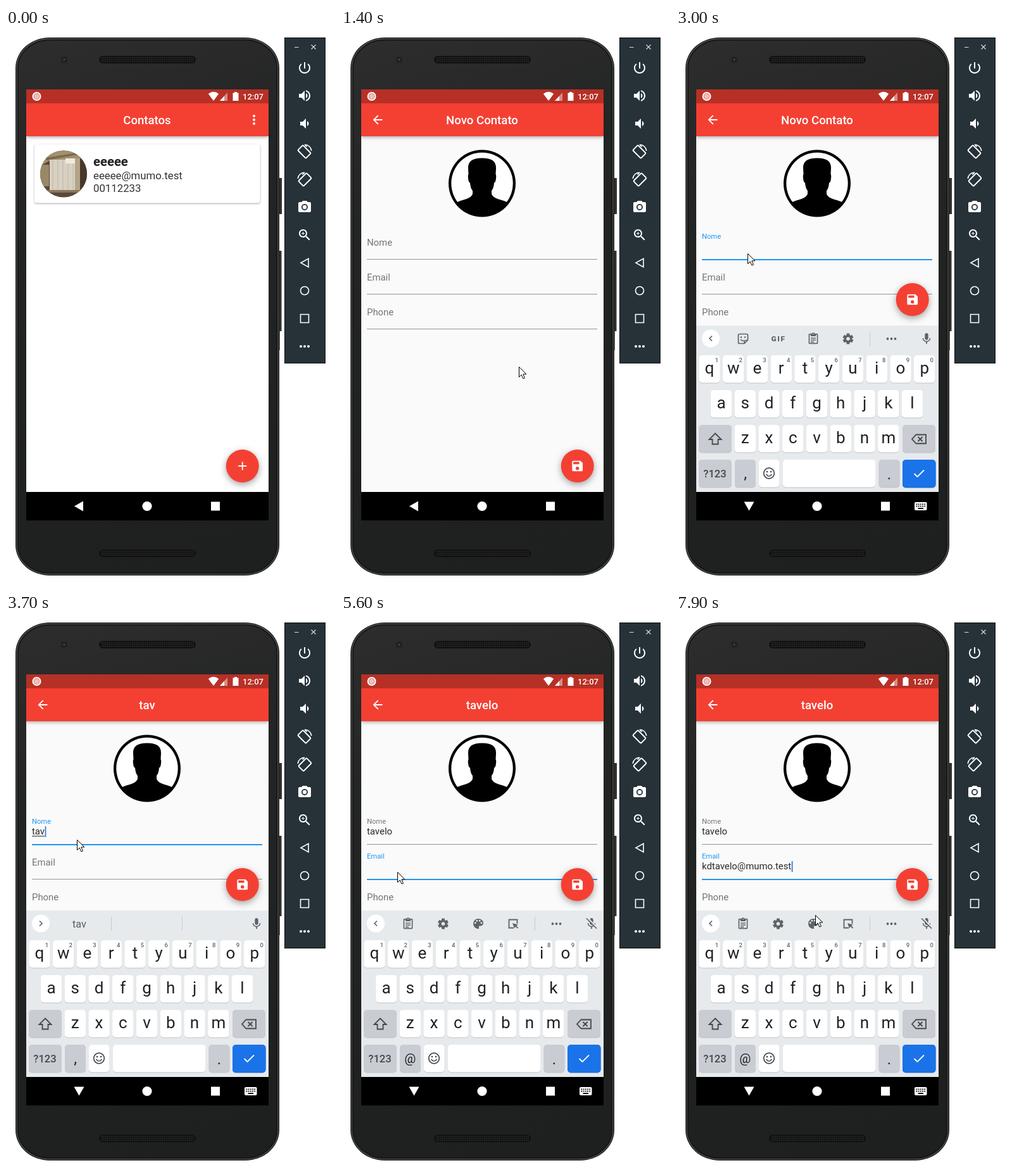
Recreate the animation shown at these times as an HTML page with a canvas. Size 520 by 880 pixels, loop 8 s.

```html
<!DOCTYPE html>
<html lang="pt">
<head>
<meta charset="utf-8">
<title>Contatos</title>
<style>
html, body { margin: 0; width: 100%; height: 100%; overflow: hidden; background: #fff; }
canvas { display: block; }
</style>
</head>
<body>
<canvas id="stage" width="520" height="880"></canvas>
<script>
const ctx = document.getElementById('stage').getContext('2d');
const LOOP = 8000, STEP = 100;
const RED = '#f44033', BLUE = '#2196f3', GREY = '#5f6368', INK = '#202124', TRAY = '#e6eaed';
const NAME = 'tavelo', USER = 'kdtavelo', HOST = '@mumo.test';
const NAME_KEYS = [3400, 3530, 3660, 3790, 3920, 4050];
const MAIL_KEYS = [5900, 6100, 6400, 6600];
const T = { press: 900, page: 1050, name: 2400, board: 2600, mail: 4800, pick: 7700, tools: 7800 };

const ICON = {
  back: 'M20 11H7.83l5.59-5.59L12 4l-8 8 8 8 1.41-1.41L7.83 13H20v-2z',
  add: 'M19 13h-6v6h-2v-6H5v-2h6V5h2v6h6v2z',
  save: 'M17 3H5c-1.11 0-2 .9-2 2v14c0 1.1.89 2 2 2h14c1.1 0 2-.9 2-2V7l-4-4zm-5 16c-1.66 0-3-1.34-3-3s1.34-3 3-3 3 1.34 3 3-1.34 3-3 3zm3-10H5V5h10v4z',
  power: 'M13 3h-2v10h2V3zm4.83 2.17l-1.42 1.42C17.99 7.86 19 9.81 19 12c0 3.87-3.13 7-7 7s-7-3.13-7-7c0-2.19 1.01-4.14 2.58-5.42L6.17 5.17C4.23 6.82 3 9.26 3 12c0 4.97 4.03 9 9 9s9-4.03 9-9c0-2.74-1.23-5.18-3.17-6.83z',
  louder: 'M3 9v6h4l5 5V4L7 9H3zm13.5 3c0-1.77-1.02-3.29-2.5-4.03v8.05c1.48-.73 2.5-2.25 2.5-4.02zM14 3.23v2.06c2.89.86 5 3.54 5 6.71s-2.11 5.85-5 6.71v2.06c4.01-.91 7-4.49 7-8.77s-2.99-7.86-7-8.77z',
  softer: 'M18.5 12c0-1.77-1.02-3.29-2.5-4.03v8.05c1.48-.73 2.5-2.25 2.5-4.02zM5 9v6h4l5 5V4L9 9H5z',
  camera: 'M9 2L7.17 4H4c-1.1 0-2 .9-2 2v12c0 1.1.9 2 2 2h16c1.1 0 2-.9 2-2V6c0-1.1-.9-2-2-2h-3.17L15 2H9zm3 15c-2.76 0-5-2.24-5-5s2.24-5 5-5 5 2.24 5 5-2.24 5-5 5z',
  zoom: 'M15.5 14h-.79l-.28-.27C15.41 12.59 16 11.11 16 9.5 16 5.91 13.09 3 9.5 3S3 5.91 3 9.5 5.91 16 9.5 16c1.61 0 3.09-.59 4.23-1.57l.27.28v.79l5 4.99L20.49 19l-4.99-5zm-6 0C7.01 14 5 11.99 5 9.5S7.01 5 9.5 5 14 7.01 14 9.5 11.99 14 9.5 14zm2.5-4h-2v2H9v-2H7V9h2V7h1v2h2v1z',
  paste: 'M19 2h-4.18C14.4.84 13.3 0 12 0c-1.3 0-2.4.84-2.82 2H5c-1.1 0-2 .9-2 2v16c0 1.1.9 2 2 2h14c1.1 0 2-.9 2-2V4c0-1.1-.9-2-2-2zm-7 0c.55 0 1 .45 1 1s-.45 1-1 1-1-.45-1-1 .45-1 1-1zm7 18H5V4h2v3h10V4h2v16z',
  palette: 'M12 3c-4.97 0-9 4.03-9 9s4.03 9 9 9c.83 0 1.5-.67 1.5-1.5 0-.39-.15-.74-.39-1.01-.23-.26-.38-.61-.38-.99 0-.83.67-1.5 1.5-1.5H16c2.76 0 5-2.24 5-5 0-4.42-4.03-8-9-8z',
  mic: 'M12 14c1.66 0 2.99-1.34 2.99-3L15 5c0-1.66-1.34-3-3-3S9 3.34 9 5v6c0 1.66 1.34 3 3 3zm5.3-3c0 3-2.54 5.1-5.3 5.1S6.7 14 6.7 11H5c0 3.41 2.72 6.23 6 6.72V21h2v-3.28c3.28-.48 6-3.3 6-6.72h-1.7z'
};
for (const k in ICON) ICON[k] = new Path2D(ICON[k]);

// Pointer path: time, x, y
const PATH = [
  [300, 512, 640], [700, 378, 692], [1000, 372, 690], [1200, 340, 630], [1400, 281, 535],
  [1600, 240, 470], [2000, 140, 352], [2100, 114, 343], [2200, 113, 356], [3000, 113, 356],
  [3200, 112, 358], [4500, 112, 358], [4800, 89, 409], [5600, 89, 409], [6200, 87, 428],
  [7100, 87, 428], [7500, 214, 490], [7700, 220, 477]
];

const clamp = v => Math.max(0, Math.min(1, v));
const lerp = (a, b, p) => a + (b - a) * p;
const easeOut = p => 1 - (1 - p) ** 3;

function rect(x, y, w, h, color) { ctx.fillStyle = color; ctx.fillRect(x, y, w, h); }
function round(x, y, w, h, r, color) {
  ctx.fillStyle = color;
  ctx.beginPath(); ctx.roundRect(x, y, w, h, r); ctx.fill();
}
function disc(x, y, r, color) {
  ctx.fillStyle = color;
  ctx.beginPath(); ctx.arc(x, y, r, 0, 7); ctx.fill();
}
function ring(x, y, r, color, w) {
  ctx.strokeStyle = color; ctx.lineWidth = w;
  ctx.beginPath(); ctx.arc(x, y, r, 0, 7); ctx.stroke();
}
function fill(d, color) { ctx.fillStyle = color; ctx.fill(new Path2D(d)); }
function line(d, color, w) { ctx.strokeStyle = color; ctx.lineWidth = w; ctx.stroke(new Path2D(d)); }
function text(s, x, y, size, color, weight = 400, align = 'left') {
  ctx.font = `${weight} ${size}px Roboto, sans-serif`;
  ctx.fillStyle = color; ctx.textAlign = align;
  ctx.fillText(s, x, y);
}
function icon(name, x, y, s, color) {
  ctx.save();
  ctx.translate(x, y); ctx.scale(s, s); ctx.translate(-12, -12);
  ctx.fillStyle = color; ctx.fill(ICON[name]);
  ctx.restore();
}
function dots(x, y, dx, dy, r, color) {
  for (let i = -1; i < 2; i++) disc(x + i * dx, y + i * dy, r, color);
}
function shadowed(blur, dy, alpha, draw) {
  ctx.save();
  ctx.shadowColor = `rgba(0,0,0,${alpha})`; ctx.shadowBlur = blur; ctx.shadowOffsetY = dy;
  draw();
  ctx.restore();
}

function shell(inset) {
  ctx.beginPath();
  ctx.roundRect(15 + inset, 15 + inset, 417 - 2 * inset, 850 - 2 * inset, { x: 54 - inset, y: 48 - inset });
}
function drawPhone() {
  rect(432, 237, 4, 57, '#303030');
  rect(432, 352, 3.5, 127, '#303030');
  rect(432, 479, 1, 30, '#666');
  ctx.fillStyle = '#191a1a'; shell(0); ctx.fill();
  const g = ctx.createLinearGradient(60, 15, 330, 865);
  g.addColorStop(0, '#2d2d2d'); g.addColorStop(.3, '#232424'); g.addColorStop(1, '#1e1f1f');
  ctx.fillStyle = g; shell(2); ctx.fill();
  ctx.lineWidth = 1.4;
  ctx.strokeStyle = '#4d4e4e'; shell(2); ctx.stroke();
  ctx.strokeStyle = '#141515'; shell(4); ctx.stroke();
  disc(92, 50, 6, '#1b1c1c'); ring(92, 50, 5, '#343636', 1); disc(92, 50, 2, '#3c4043');
  for (const y of [44, 824]) {
    round(147, y, 153, 12, 6, '#111');
    for (let i = 0; i < 49; i++)
      for (let j = 0; j < 3; j++) rect(151 + i * 3, y + 2 + j * 3, 1.5, 1.5, '#343434');
  }
}

function rotateIcon(y, flip) {
  ctx.save();
  ctx.translate(472, y); ctx.scale(flip, 1);
  ctx.save();
  ctx.translate(-.5, .5); ctx.rotate(Math.PI / 4);
  ctx.strokeStyle = '#fff'; ctx.lineWidth = 2;
  ctx.beginPath(); ctx.roundRect(-9, -5.7, 18, 11.4, 1.5); ctx.stroke();
  ctx.restore();
  line('M0 -10.8A10.8 10.8 0 0 1 10.8 -1M0 -10.8L3.5 -7.3', '#fff', 1.6);
  ctx.restore();
}

function drawPanel() {
  rect(440, 15, 65, 515, '#0c1012');
  rect(441, 16, 63, 513, '#263238');
  line('M456 30.5h6.5M482.5 26.5l7 7M489.5 26.5l-7 7', '#d8dcde', 1.2);
  icon('power', 472, 63, 1, '#fff');
  icon('louder', 472, 107, 1, '#fff');
  icon('softer', 472, 151, 1, '#fff');
  rotateIcon(195, 1);
  rotateIcon(239, -1);
  icon('camera', 472, 283, 1, '#fff'); disc(472, 283, 3.2, '#fff');
  icon('zoom', 472, 327, 1, '#fff');
  line('M466 371L478 364.3V377.7Z', '#fff', 1.6);
  ring(472, 415, 6.5, '#fff', 1.6);
  line('M465.5 452.5h13v13h-13z', '#fff', 1.6);
  dots(472, 503, 6, 0, 2, '#fff');
}

function drawStatus() {
  rect(32, 97, 383, 22, 'rgba(0,0,0,.25)');
  disc(48.5, 108, 7, '#fff'); disc(48.5, 108, 5, '#d9786f'); disc(48.5, 108, 4, '#f0c0bb');
  fill('M328 115L319.8 104Q328 97.5 336.2 104Z', '#fff');
  fill('M338 115L350 102V115Z', 'rgba(255,255,255,.45)');
  fill('M338 115L345 107.4V115Z', '#fff');
  fill('M358.5 102.5H361V101h4v1.5h2.5V115h-9z', '#fff');
  text('12:07', 374, 113, 13, '#fff', 500);
}

function appBar(title) {
  shadowed(5, 2, .3, () => rect(32, 97, 383, 74, RED));
  text(title, 223, 152, 18.6, '#fff', 500, 'center');
}

function drawPhoto() {
  ctx.save();
  ctx.beginPath(); ctx.arc(91, 230.5, 37, 0, 7); ctx.clip();
  rect(54, 193, 75, 75, '#59493a');
  fill('M54 193H129V207L68 210L54 218Z', '#a3906f');
  fill('M62 205L120 196V199L64 209Z', '#7c6a4e');
  rect(54, 216, 14, 34, '#9a8768');
  rect(69, 208, 40, 48, '#d8d1c2');
  for (let i = 0; i < 5; i++) rect(73 + i * 8, 208, 2, 48, '#cbc3b2');
  rect(94, 206, 15, 8, '#eeeae0');
  rect(109, 206, 8, 50, '#b3a488');
  rect(117, 206, 12, 50, '#473829');
  rect(54, 256, 75, 4, '#8a7759');
  ctx.restore();
}

function drawList() {
  rect(32, 97, 383, 636, '#fff');
  appBar('Contatos');
  dots(392, 145, 0, 6, 2, '#fff');
  shadowed(3, 1, .35, () => round(45, 184, 356.5, 92.5, 3.5, '#fff'));
  drawPhoto();
  text('eeeee', 138, 218, 20.3, INK, 700);
  text('eeeee' + HOST, 138, 239, 16.8, '#333');
  text('00112233', 138, 259, 16.8, '#333');
}

function drawAvatar() {
  disc(223, 245.5, 53, '#000');
  disc(223, 245.5, 48.7, '#fff');
  ctx.save();
  ctx.beginPath(); ctx.arc(223, 245.5, 51, 0, 7); ctx.clip();
  fill('M223 205.5C239 205.5 245.5 211 245 222L244.5 231Q246 233 244.5 241Q243.5 244.5 242 244.5Q241.5 253 238 257V262Q239 267 249 270.5Q264 274.5 271 280V300H175V280Q182 274.5 197 270.5Q207 267 208 262V257Q204.5 253 204 244.5Q202.5 244.5 201.5 241Q200 233 201.5 231L201 222C200.5 211 207 205.5 223 205.5Z', '#000');
  ctx.restore();
}

function field(label, i, value, f) {
  const y = i * 55, p = f.float;
  const color = f.focus ? BLUE : '#757575';
  text(label, 41, lerp(344, 333, p) + y, lerp(14.9, 11.2, p), color);
  if (f.focus) rect(41, 365 + y, 364, 2, BLUE);
  else rect(41, 365 + y, 364, 1, '#949494');
  text(value, 41, 350 + y, 14.9, '#2b2b2b');
  const end = 41 + ctx.measureText(value).width;
  if (f.compose && value) rect(41, 352 + y, end - 41, 1, '#2b2b2b');
  if (f.caret) rect(end + .5, 337 + y, 1.8, 17, '#2f80e0');
}

function drawForm(s) {
  rect(32, 97, 383, 636, '#fafafa');
  appBar(s.name || 'Novo Contato');
  icon('back', 58, 145, .93, '#fff');
  drawAvatar();
  field('Nome', 0, s.name, {
    focus: s.onName, float: s.nameFloat, compose: s.onName, caret: s.onName && s.caret });
  field('Email', 1, s.mail, {
    focus: s.onMail, float: s.mailFloat, compose: s.onMail && !s.picked, caret: s.onMail && s.caret });
  field('Phone', 2, '', { float: 0 });
}

function drawFab(y, glyph, press) {
  shadowed(11 + press * 5, 3.5 + press, .36, () => disc(373.7, y, 26, RED));
  if (press) disc(373.7, y, 26 * press, 'rgba(255,255,255,.2)');
  icon(glyph, 373.7, y, .93, '#fff');
}

function gear(x, y) {
  ctx.save();
  ctx.translate(x, y);
  for (let i = 0; i < 6; i++) { rect(-2.4, -8.4, 4.8, 5, GREY); ctx.rotate(Math.PI / 3); }
  ctx.restore();
  ring(x, y, 4.6, GREY, 3.6);
}
function clipboard(x, y) {
  icon('paste', x, y, .82, GREY);
  line(`M${x - 4} ${y - 1}h8M${x - 4} ${y + 2}h8M${x - 4} ${y + 5}h5`, GREY, 1.4);
}
function sticker(x, y) {
  line(`M${x + 2} ${y + 7.5}H${x - 5.5}q-2 0 -2 -2v-11q0 -2 2 -2h11q2 0 2 2V${y + 2}zv-3q0 -2 2 -2h3.5`, GREY, 1.7);
  disc(x - 3, y - 2.5, 1.2, GREY); disc(x + 3, y - 2.5, 1.2, GREY);
  line(`M${x - 4} ${y + 1}q2 3 5 1.5`, GREY, 1.4);
}
function palette(x, y) {
  icon('palette', x, y, .88, GREY);
  for (const [dx, dy] of [[-4.8, -1.3], [-2.2, -4.8], [2.2, -4.8], [4.8, -1.3]]) disc(x + dx, y + dy, 1.4, TRAY);
}
function touchPad(x, y) {
  line(`M${x + 1} ${y + 6.5}H${x - 6.5}v-13h13V${y}`, GREY, 1.8);
  fill(`M${x - 1} ${y - 1}l3 8l2 -2.5l3 3l1.3 -1.3l-3 -3l2.5 -1.6z`, GREY);
}

function drawStrip(s) {
  const typed = s.onMail ? s.mail : s.name;
  const suggest = typed && !s.tools;
  disc(55, 490.5, 14, '#fff');
  line(suggest ? 'M53 486.5l4 4l-4 4' : 'M57 486.5l-4 4l4 4', GREY, 1.7);
  if (suggest) {
    rect(166, 480, 1, 22, '#c6c9cd'); rect(278, 480, 1, 22, '#c6c9cd');
    text(typed, 116, 497, 16.3, '#5a5f64', 400, 'center');
    if (s.onMail) {
      text(USER, 222, 486, 14.3, '#50555a', 500, 'center');
      text(HOST, 222, 502, 11.5, '#50555a', 400, 'center');
    } else if (typed === NAME) text(NAME + '1', 222, 497, 16.3, '#5a5f64', 400, 'center');
  } else {
    if (s.mailBoard) {
      clipboard(106, 491); gear(161.5, 491); palette(217, 491); touchPad(272, 491);
    } else {
      sticker(106, 491);
      ctx.letterSpacing = '1.6px';
      text('GIF', 162, 495, 11.8, GREY, 900, 'center');
      ctx.letterSpacing = '0px';
      clipboard(217, 491); gear(272, 491);
    }
    rect(306, 480, 1, 22, '#c6c9cd');
    dots(340.5, 491, 6, 0, 1.9, GREY);
  }
  icon('mic', 396, 491, .9, GREY);
  if (s.mailBoard) {
    line('M389.5 481.5l16 16', TRAY, 2);
    line('M388 482.5l16 16', GREY, 1.7);
  }
}

function key(x, y, w, color = '#fff', edge = '#c0c4c8') {
  round(x, y + 1, w, 43.5, 5, edge);
  round(x, y, w, 43.5, 5, color);
}
function letters(row, x0, y, hints) {
  [...row].forEach((c, i) => {
    const x = x0 + i * 37.75;
    key(x - 16.7, y, 33.4);
    text(c, x, y + 29, 26, INK, 400, 'center');
    if (hints) text((i + 1) % 10, x + 11.5, y + 11, 9.5, GREY, 500, 'center');
  });
}

function drawBoard(s) {
  const alt = '#c9ccd2';
  rect(32, 470, 383, 263, TRAY);
  drawStrip(s);
  letters('qwertyuiop', 53, 517, true);
  letters('asdfghjkl', 71.5, 572);
  letters('zxcvbnm', 109.3, 627);
  key(36, 627, 52, alt); key(358, 627, 52, alt);
  line('M62 640.5l9.5 9.5h-5v7.5h-9v-7.5h-5z', '#44474b', 1.8);
  line('M379.5 642.5h15.5v14h-15.5l-6.5 -7zM382.5 646l7 7M389.5 646l-7 7', '#44474b', 1.8);
  key(36, 682, 52, alt); key(93, 682, 33, alt); key(131, 682, 32.5);
  key(169, 682, 146.5); key(320.5, 682, 33, alt); key(358, 682, 52.5, '#1a73e8', '#1765cc');
  text('?123', 61.5, 710, 16.6, '#44474b', 500, 'center');
  if (s.mailBoard) text('@', 109.3, 711, 20, INK, 400, 'center');
  else text(',', 109.5, 712, 24, INK, 400, 'center');
  text('.', 337, 713, 24, INK, 400, 'center');
  ring(147, 703.5, 8.3, '#44474b', 1.7);
  disc(144, 701, 1.3, '#44474b'); disc(150, 701, 1.3, '#44474b');
  line('M142.5 705q4.5 6 9 0', '#44474b', 1.6);
  line('M376.5 704l5 5l10.5 -10.5', '#fff', 1.8);
}

function drawNav(open) {
  rect(32, 733, 383, 45, '#000');
  fill(open ? 'M107.5 748.5H123.5L115.5 762.5Z' : 'M108 755.5L122 747.5V763.5Z', '#fff');
  disc(223, 755.5, 7.6, '#fff');
  rect(324, 748.5, 14, 14, '#fff');
  if (!open) return;
  round(377, 749, 19.5, 13, 2, '#fff');
  for (let i = 0; i < 5; i++)
    for (let j = 0; j < 2; j++) rect(379.5 + i * 3.2, 751.5 + j * 3.2, 1.8, 1.8, '#000');
  rect(382.5, 758.2, 8.5, 1.8, '#000');
}

function drawPointer(t) {
  if (t < PATH[0][0]) return;
  let i = PATH.length - 1;
  while (PATH[i][0] > t) i--;
  const a = PATH[i], b = PATH[i + 1] || a;
  const p = b === a ? 0 : (t - a[0]) / (b[0] - a[0]);
  ctx.save();
  ctx.translate(Math.round(lerp(a[1], b[1], p)) + .5, Math.round(lerp(a[2], b[2], p)) + .5);
  const shape = 'M0 0V16L3.7 12.4L6.4 18.5L9 17.4L6.3 11.4H11.4Z';
  fill(shape, '#fff'); line(shape, '#000', 1);
  ctx.restore();
}

function stateAt(t) {
  const typed = keys => keys.filter(k => k <= t).length;
  const picked = t >= T.pick;
  const last = Math.max(...[T.name, T.mail, T.pick, ...NAME_KEYS, ...MAIL_KEYS].filter(k => k <= t), 0);
  return {
    name: NAME.slice(0, typed(NAME_KEYS)),
    mail: picked ? USER + HOST : USER.slice(0, typed(MAIL_KEYS)),
    picked,
    tools: t >= T.tools,
    onName: t >= T.name && t < T.mail,
    onMail: t >= T.mail,
    mailBoard: t >= T.mail + 100,
    nameFloat: easeOut(clamp((t - T.name) / 200)),
    mailFloat: easeOut(clamp((t - T.mail) / 200)),
    caret: (t - last) % 1000 < 500
  };
}

function draw(t) {
  const s = stateAt(t);
  const page = clamp((t - T.page) / 300);
  const open = t >= T.board;
  ctx.clearRect(0, 0, 520, 880);
  drawPhone();
  drawPanel();
  ctx.save();
  ctx.beginPath(); ctx.rect(32, 97, 383, 681); ctx.clip();
  if (page < 1) drawList();
  if (page > 0) {
    ctx.save();
    ctx.globalAlpha = page * page;
    ctx.translate(0, 159 * (1 - easeOut(page)));
    drawForm(s);
    ctx.restore();
  }
  drawStatus();
  const press = t < T.press || t > 1300 ? 0 : clamp((t - T.press + 100) / 200);
  drawFab(open ? 429 : 692, page > 0 ? 'save' : 'add', press);
  if (open) {
    ctx.save();
    ctx.translate(0, 263 * (1 - easeOut(clamp((t - T.board + 50) / 250))));
    drawBoard(s);
    ctx.restore();
  }
  drawNav(open);
  ctx.restore();
  drawPointer(t);
}

const start = performance.now();
function tick() {
  const t = (performance.now() - start) % LOOP;
  draw(Math.floor(t / STEP) * STEP);
  requestAnimationFrame(tick);
}
tick();
</script>
</body>
</html>
```
